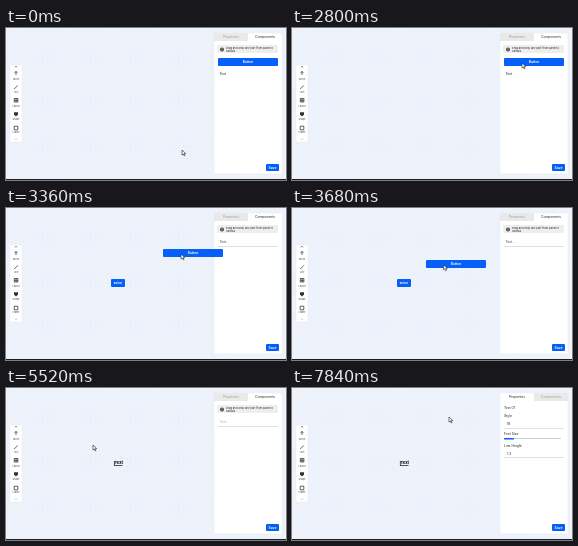
An HTML page with a canvas that plays this animation: 280x152 px, repeating every 8 s.

```html
<!DOCTYPE html>
<html lang="en">
<head>
<meta charset="utf-8">
<title>Drag and drop editor</title>
<style>
html, body { margin: 0; width: 100%; height: 100%; overflow: hidden; background: #edf2fb; }
canvas, svg { position: absolute; left: 0; top: 0; width: 280px; height: 152px; }
text { font: 3.3px Inter, Arial, sans-serif; fill: #222; }
.dim { fill: #999; }
.blue { fill: #0560fa; }
.cap { fill: #fff; text-anchor: middle; font-weight: 600; }
.mid { text-anchor: middle; }
.note { font-size: 2.7px; }
.tiny { font-size: 2.3px; fill: #444; text-anchor: middle; }
.rule { stroke: #e0e0e0; }
.icon { fill: none; stroke: #222; stroke-width: .7; }
</style>
</head>
<body>
<canvas id="dots" width="280" height="152"></canvas>
<svg viewBox="0 0 280 152">
  <rect y="151" width="280" height="1" fill="#1c1e22"/>

  <rect x="4" y="37" width="12" height="77" rx="1" fill="#fff" stroke="#e4e8ef" stroke-width=".4"/>
  <g class="icon">
    <path d="M9 39.3l1-1 1 1M10 43.5v3.5M8.6 44.8l1.4-1.4 1.4 1.4"/>
    <path d="M8.2 61l3.6-3.6"/>
    <path d="M8.3 70.5h3.6v3.5H8.3zM8.3 72.3h3.6M10.1 70.5v3.5"/>
    <path d="M8.2 98.2h3.6v3.6H8.2z"/>
    <path d="M8.8 111.2h2.4" stroke="#bbb"/>
  </g>
  <path d="M8 84.2h4v2.3l-2 1.9-2-1.9z" fill="#333"/>
  <text class="tiny" x="10" y="51.6">Move</text>
  <text class="tiny" x="10" y="65.2">Line</text>
  <text class="tiny" x="10" y="78.8">Layout</text>
  <text class="tiny" x="10" y="92">Shape</text>
  <text class="tiny" x="10" y="105.4">Frame</text>

  <rect x="208" y="5" width="68" height="141" rx="1.5" fill="#fff" stroke="#e5e9f0" stroke-width=".5"/>

  <g id="parts">
    <rect x="208" y="5" width="34" height="8" fill="#e9e9e9"/>
    <text class="mid dim" x="225" y="10.2">Properties</text>
    <text class="mid" x="259" y="10.2">Components</text>
    <rect x="211" y="17" width="61" height="8" rx="1" fill="#eee"/>
    <circle cx="216" cy="21.4" r="2" fill="#444"/>
    <path d="M216 20.3v2.2" stroke="#fff" stroke-width=".5"/>
    <text class="note" x="220" y="21">Drag and drop any part from panel to</text>
    <text class="note" x="220" y="24.3">canvas</text>
    <text id="before" x="213.5" y="47.2">Text</text>
    <g id="after">
      <text id="label" x="213.5" y="35.4">Text...</text>
      <path class="rule" d="M212 38.5h60"/>
    </g>
  </g>

  <g id="props">
    <rect x="242" y="5" width="34" height="8" fill="#e9e9e9"/>
    <text class="mid" x="225" y="10.2">Properties</text>
    <text class="mid dim" x="259" y="10.2">Components</text>
    <text x="212" y="20.6">Text 01</text>
    <text x="212" y="29.3">Style</text>
    <text x="215" y="37.4" font-weight="700">16</text>
    <path class="rule" d="M212 40.5h60"/>
    <text x="212" y="46.8">Font Size</text>
    <rect x="212" y="50" width="57" height="1" fill="#cbd0da"/>
    <rect class="blue" x="212" y="50" width="10" height="1.6" rx=".5"/>
    <text x="212" y="58.6">Line Height</text>
    <text x="215" y="67.2">1.2</text>
    <path class="rule" d="M212 69.5h60"/>
  </g>

  <rect class="blue" x="260" y="136" width="13" height="7" rx="1"/>
  <text class="cap" x="266.5" y="140.7">Save</text>

  <g id="placed">
    <rect class="blue" x="105" y="71" width="14" height="8" rx="1"/>
    <text class="cap note" x="112" y="76.2">Button</text>
  </g>
  <g id="word">
    <text x="108.5" y="76.4" style="font-size:4px;font-weight:700;fill:#000">Text</text>
    <path d="M108 77.5h8.5M108.4 73v4.5" stroke="#111" stroke-width=".7"/>
  </g>
  <g id="drag">
    <rect class="blue" width="60" height="8" rx="1"/>
    <text class="cap" x="30" y="5.3">Button</text>
  </g>
  <path id="cursor" d="M0 0v5l1.2-1 .9 1.9 .9-.4-.9-1.9h1.7z" fill="#fff" stroke="#222" stroke-width=".6"/>
</svg>
<script>
const LOOP = 8000, STEP = 80;
const HOME = [176, 122], GRAB = [230, 35], SLOT = [212, 30];
const LIFT = 2800, DROP = 4160, SWITCH = 7280;
const $ = id => document.getElementById(id);

// Cursor moves: start ms, end ms, goal
const moves = [
  [0, 160, [240, 36]],
  [960, 1760, GRAB],
  [LIFT, 3360, [175, 46]],
  [3360, 3920, [134, 65]],
  [4960, 5280, [87, 57]],
  [5520, 6000, [41, 40]],
  [6000, 6320, [180, 5]],
  [6400, 6960, [219, 9]],
  [7440, 7840, [157, 29]]
];

function cursorAt(t) {
  return moves.reduce((from, [start, end, goal]) => {
    const k = Math.min(1, Math.max(0, (t - start) / (end - start)));
    return from.map((v, i) => v + (goal[i] - v) * k);
  }, HOME);
}
const place = (id, pos) => $(id).setAttribute('transform', `translate(${pos})`);
const show = (id, on) => { $(id).style.display = on ? '' : 'none'; };

function drawDots() {
  const c = $('dots').getContext('2d');
  const wave = (v, period, shift) => .5 + .5 * Math.cos((v - shift) / period * 2 * Math.PI);
  for (let y = 2; y < 151; y += 4)
    for (let x = 1; x < 280; x += 4) {
      const a = .08 + .4 * Math.sqrt(wave(x, 45, 40) * wave(y, 44, 30));
      c.fillStyle = `rgba(206,218,238,${a})`;
      c.fillRect(x, y, 1, 1);
    }
}

function draw(t) {
  const cursor = cursorAt(t);
  place('cursor', cursor);
  const lifted = t > LIFT, dropped = t >= DROP, switched = t >= SWITCH;
  place('drag', SLOT.map((v, i) => lifted ? Math.round(v + cursor[i] - GRAB[i]) : v));
  show('drag', !dropped);
  show('placed', lifted && !dropped);
  show('word', dropped);
  show('before', !lifted);
  show('after', lifted);
  $('label').style.fill = dropped ? '#aaa' : '#444';
  show('parts', !switched);
  show('props', switched);
}

function tick() {
  draw(Math.floor(performance.now() % LOOP / STEP) * STEP);
  requestAnimationFrame(tick);
}
drawDots();
tick();
</script>
</body>
</html>
```
